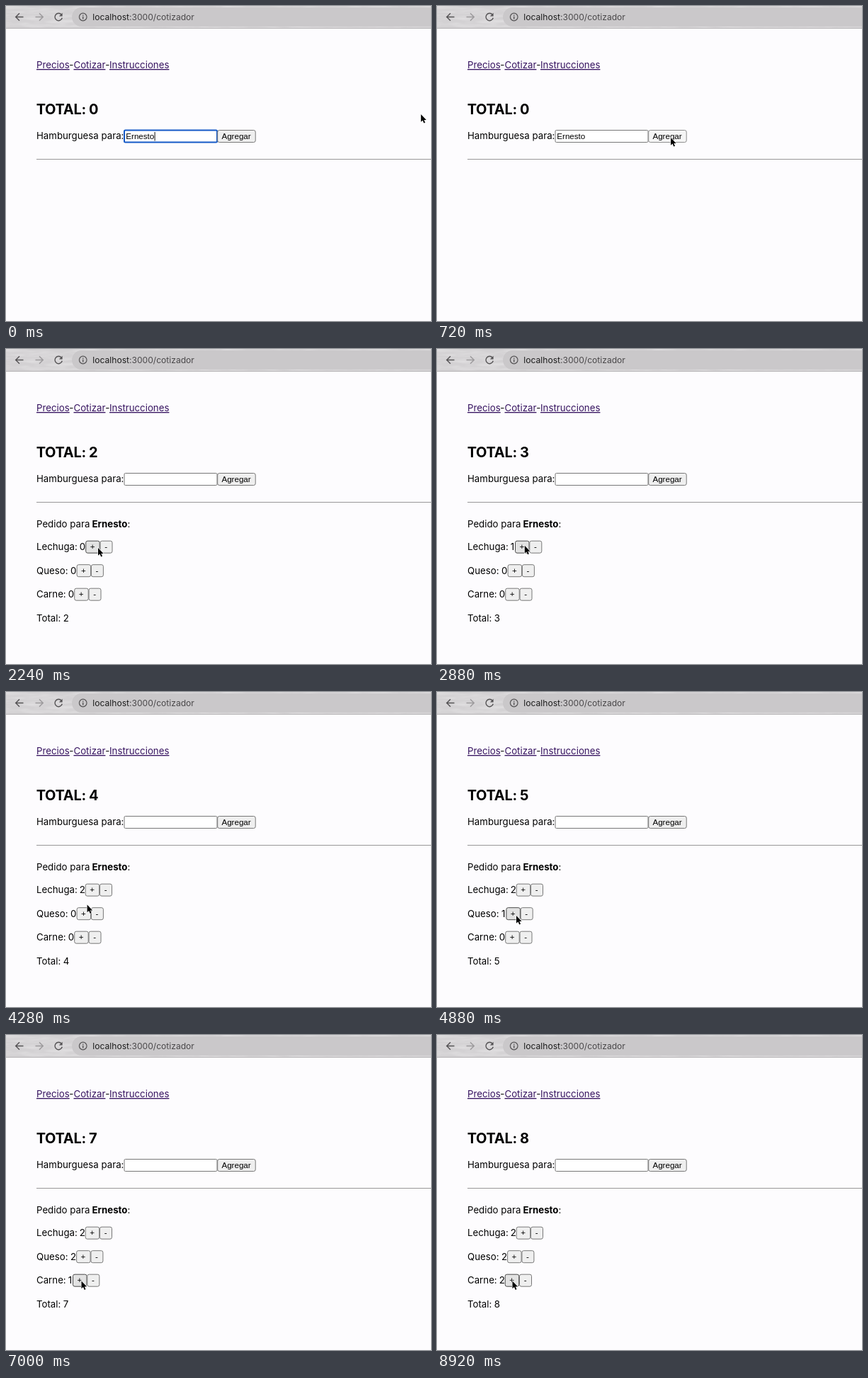
Recreate the animation shown at these times as an HTML page. Size 600 by 445 pixels, loop 8.96 s.

```html
<!DOCTYPE html>
<html lang="es">
<head>
<meta charset="utf-8">
<title>Cotizador</title>
<style>
html, body { margin: 0; width: 100%; height: 100%; overflow: hidden; background: #fdfcfe; }
svg { display: block; width: 100vw; height: 100vh; }
text { font: 13.25px Inter, Roboto, sans-serif; fill: #000; white-space: pre; }
.url { font-size: 12.1px; fill: #4a484a; }
.host { fill: #1c1c1c; }
.link { fill: #35125f; text-decoration: underline; text-decoration-thickness: 1px; text-underline-offset: 1px; }
.title { font-size: 20px; font-weight: 700; letter-spacing: -.3px; }
.bold { font-weight: 700; }
.ctl { font: 11.6px "Liberation Sans", Arial, sans-serif; }
.mid { text-anchor: middle; }
.icon { fill: none; stroke: #555355; stroke-width: 1.4; }
.btn rect { fill: #efefef; stroke: #777; }
.btn.hover rect { fill: #e2e2e2; stroke: #484848; }
.btn.down rect { fill: #f5f5f5; stroke: #8d8d8d; }
</style>
</head>
<body>
<svg id="stage" viewBox="0 0 600 445" preserveAspectRatio="none">
  <defs>
    <filter id="grain" x="0" y="0" width="100%" height="100%">
      <feTurbulence type="fractalNoise" baseFrequency=".03 .2" numOctaves="3" seed="4"/>
      <feColorMatrix values="0 0 0 0 1  0 0 0 0 1  0 0 0 0 1  .6 0 0 0 -.2"/>
    </filter>
  </defs>
  <rect width="600" height="445" fill="#fdfcfe"/>
  <rect width="600" height="31" fill="#d3d1d3"/>
  <rect width="600" height="31" filter="url(#grain)"/>
  <rect x="93" y="2" width="540" height="27" rx="13.5" fill="#cac8ca"/>
  <rect y="31" width="600" height="1" fill="#b4b2b4"/>
  <path class="icon" d="M24.5 15.5H13.8M19 10.2L13.7 15.5L19 20.8"/>
  <path class="icon" style="stroke:#9c9a9c" d="M41.5 15.5H52.2M47 10.2L52.3 15.5L47 20.8"/>
  <path class="icon" d="M78.3 12.2A5.2 5.2 0 1 0 79.3 16.8"/>
  <path d="M79.6 9.8V14.6H74.8Z" fill="#555355"/>
  <circle class="icon" cx="108.7" cy="15.5" r="5.3" style="stroke-width:1.2"/>
  <path class="icon" d="M108.7 14.8V18.4M108.7 12.4V13.7"/>
  <text class="url" x="122.3" y="19.9"><tspan class="host">localhost</tspan>:3000/cotizador</text>

  <text class="link" x="43" y="88">Precios</text>
  <text x="89.3" y="88">-</text>
  <text class="link" x="95.5" y="88">Cotizar</text>
  <text x="140.3" y="88">-</text>
  <text class="link" x="146" y="88">Instrucciones</text>

  <text class="title" x="42.7" y="153.4">TOTAL:</text>
  <text class="title" x="117" y="153.4" id="sum"></text>
  <text x="43" y="188">Hamburguesa para:</text>
  <rect id="field" x="167" y="175.5" width="131" height="17" rx="1.5" fill="#fff"/>
  <g id="typed">
    <text class="ctl" x="169.3" y="188">Ernesto</text>
    <rect x="209.6" y="178" width="1" height="12.5" fill="#111"/>
  </g>
  <rect x="43" y="216" width="557" height="1" fill="#989798"/>

  <g id="order">
    <text x="43" y="252.4">Pedido para</text>
    <text x="121.5" y="252.4"><tspan class="bold">Ernesto</tspan>:</text>
    <text x="43" y="384.7">Total:</text>
    <text x="80.7" y="384.7" id="subtotal"></text>
  </g>
  <g id="buttons"></g>
  <path id="pointer" d="M0 0V10.8L2.5 8.6L4.2 12.5L6 11.7L4.3 7.9H7.6Z" fill="#000" stroke="#fff" stroke-width="1.2" paint-order="stroke"/>
</svg>
<script>
const LOOP = 8960, STEP = 40;
const $ = id => document.getElementById(id);

function add(parent, tag, attrs, content = "") {
  const node = document.createElementNS("http://www.w3.org/2000/svg", tag);
  for (const key in attrs) node.setAttribute(key, attrs[key]);
  node.textContent = content;
  return parent.appendChild(node);
}

function makeButton(parent, label, y, w) {
  const g = add(parent, "g", { class: "btn" });
  add(g, "rect", { x: .5, y: .5, width: w - 1, height: 17, rx: 2.5 });
  add(g, "text", { class: "ctl mid", x: w / 2 - .4, y: 12.7 }, label);
  return { g, y, w, x: 0 };
}

function place(button, x, at, down) {
  button.x = x;
  const over = at.x >= x && at.x < x + button.w && at.y >= button.y && at.y < button.y + 18;
  button.g.setAttribute("transform", `translate(${x} ${button.y})`);
  button.g.setAttribute("class", "btn" + (down ? " down" : over ? " hover" : ""));
}

// pointer path: time, x, y
const path = [
  [0, 585.8, 153], [40, 585.8, 153], [360, 440, 178], [680, 330, 186],
  [1240, 330, 186], [1480, 180.8, 261.7], [1680, 170, 265.5],
  [1840, 170, 265.5], [2240, 130, 281], [2680, 123.8, 277.8],
  [3840, 123.8, 277.8], [4280, 114.6, 300.5], [4720, 112, 316],
  [6160, 112, 316], [6400, 107, 357],
  [6560, 107, 357], [6840, 106.5, 347.5], [LOOP, 106.5, 347.5]
];

// slope at a path point; zero where the pointer rests
function slope(i, k) {
  const a = path[i - 1], b = path[i], c = path[i + 1];
  if (!a || !c || (b[k] - a[k]) * (c[k] - b[k]) <= 0) return 0;
  return (c[k] - a[k]) / (c[0] - a[0]);
}

function pointerAt(t) {
  let i = 0;
  while (i < path.length - 2 && t >= path[i + 1][0]) i++;
  const a = path[i], b = path[i + 1], d = b[0] - a[0], u = (t - a[0]) / d;
  const mix = k => {
    const s = u * u * (3 - 2 * u);
    return a[k] + (b[k] - a[k]) * s
      + d * u * (1 - u) * ((1 - u) * slope(i, k) - u * slope(i + 1, k));
  };
  return { x: mix(1), y: mix(2) };
}

// clicks: [press, release]
const addClick = [720, 800];
const rows = [
  { name: "Lechuga", y: 270.7, digit: 103.7, x: 112.2, clicks: [[2760, 2840], [3360, 3480]] },
  { name: "Queso", y: 304.2, digit: 91, x: 99.6, clicks: [[4760, 4840], [5280, 5400]] },
  { name: "Carne", y: 337.7, digit: 87.8, x: 96.2, clicks: [[6880, 6960], [7480, 7560]] }
];
const digitShift = [0, -2.2, -.5];
const held = (t, [press, release]) => t >= press && t < release;

const addButton = makeButton($("buttons"), "Agregar", 175, 54.5);
for (const row of rows) {
  const g = $("order");
  add(g, "text", { x: 43, y: row.y + 13.3 }, row.name + ":");
  row.count = add(g, "text", { x: row.digit, y: row.y + 13.3 });
  row.plus = makeButton(g, "+", row.y, 20.5);
  row.minus = makeButton(g, "-", row.y, 18);
}

function render(t) {
  const at = pointerAt(t);
  const focused = t < addClick[0], added = t >= addClick[1];
  let total = added ? 2 : 0;

  for (const row of rows) {
    const n = row.clicks.filter(c => t >= c[1]).length;
    const x = row.x + digitShift[n];
    total += n;
    row.count.textContent = n;
    place(row.plus, x, at, row.clicks.some(c => held(t, c)));
    place(row.minus, x + 20.3, at, false);
  }
  place(addButton, 298.2, at, held(t, addClick));

  $("sum").textContent = $("subtotal").textContent = total;
  $("order").style.display = added ? "" : "none";
  $("typed").style.display = added ? "none" : "";
  $("typed").lastElementChild.style.display = focused ? "" : "none";
  $("field").setAttribute("stroke", focused ? "#1459c7" : "#777");
  $("field").setAttribute("stroke-width", focused ? 2 : 1);
  $("pointer").setAttribute("transform", `translate(${at.x} ${at.y})`);
}

const start = performance.now();
function tick() {
  const t = (performance.now() - start) % LOOP;
  render(Math.floor(t / STEP) * STEP);
  requestAnimationFrame(tick);
}
render(0);
requestAnimationFrame(tick);
</script>
</body>
</html>
```
